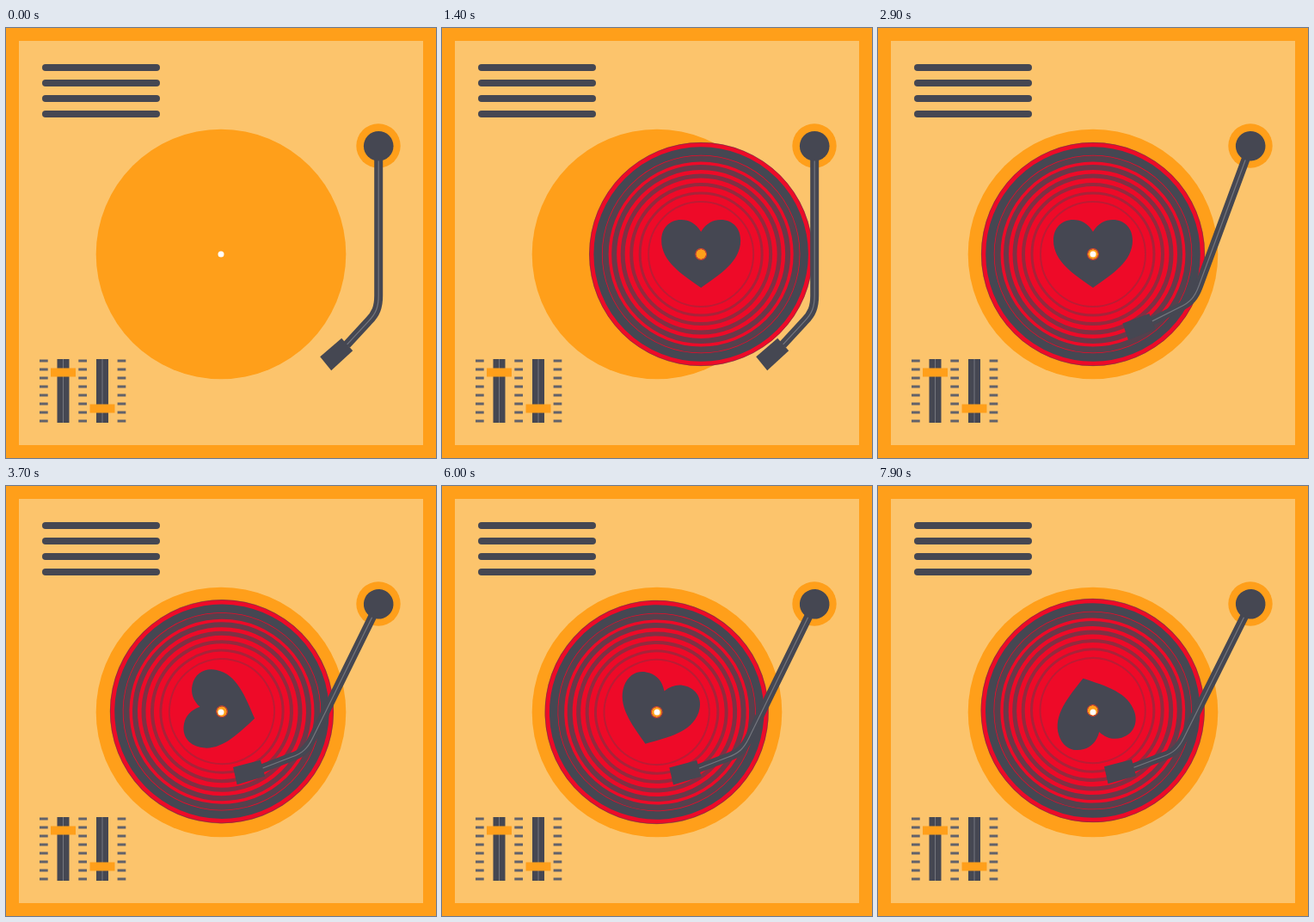
An HTML page with a canvas that plays this animation: 500 px wide and 500 px high, repeating every 8 s.

```html
<!DOCTYPE html>
<html lang="en">
<head>
<meta charset="utf-8">
<title>Turntable</title>
<style>
  html, body { margin: 0; width: 100%; height: 100%; overflow: hidden; }
  canvas { display: block; width: 500px; height: 500px; }
</style>
</head>
<body>
<canvas id="stage" width="500" height="500"></canvas>
<script>
const ORANGE = '#ff9f1a', PANEL = '#fcc46c', DARK = '#454752', RED = '#ee0a28', SHINE = '#74767e';
const LOOP = 8000, STEP = 100;
const ctx = document.getElementById('stage').getContext('2d');

const HEART = new Path2D('M0-26C-6-36-14-40-23-40C-37-40-46-30-46-16C-46 8-23 23 0 39' +
  'C23 23 46 8 46-16C46-30 37-40 23-40C14-40 6-36 0-26Z');
const ARM = new Path2D('M0 0V174C0 187-3 195-12 204L-37 231');
const HEAD = new Path2D('M-68 245L-43 223.5L-30 238L-55 261Z');

const clamp = p => Math.max(0, Math.min(1, p));
const easeInOut = p => p < 0.5 ? 2 * p * p : 1 - 2 * (1 - p) ** 2;
const progress = (t, start, length) => easeInOut(clamp((t - start) / length));

function rect(x, y, w, h, color) {
  ctx.fillStyle = color;
  ctx.fillRect(x, y, w, h);
}

function disc(x, y, r, color) {
  ctx.fillStyle = color;
  ctx.beginPath();
  ctx.arc(x, y, r, 0, 2 * Math.PI);
  ctx.fill();
}

function ring(r, width, color, alpha = 1) {
  ctx.globalAlpha = alpha;
  ctx.strokeStyle = color;
  ctx.lineWidth = width;
  ctx.beginPath();
  ctx.arc(0, 0, r, 0, 2 * Math.PI);
  ctx.stroke();
  ctx.globalAlpha = 1;
}

function stroke(path, width, color) {
  ctx.strokeStyle = color;
  ctx.lineWidth = width;
  ctx.stroke(path);
}

function drawDeck() {
  rect(0, 0, 500, 500, ORANGE);
  rect(15, 15, 470, 470, PANEL);

  ctx.lineCap = 'round';
  for (let y = 46; y <= 100; y += 18) stroke(new Path2D(`M46 ${y}H175`), 8, DARK);
  ctx.lineCap = 'butt';

  for (const x of [39, 84.3, 129.6])
    for (let y = 385.5; y < 460; y += 10) rect(x, y, 9.7, 3, '#62626a');
  for (const [x, y] of [[66.5, 395.5], [112, 437.5]]) {
    rect(x - 7, 385, 14, 74, DARK);
    rect(x - 0.5, 385, 1, 74, SHINE);
    rect(x - 14.5, y, 29, 10, ORANGE);
  }

  disc(250, 263, 145.3, ORANGE);
  disc(250, 263, 3.5, '#fff');
  disc(433, 137, 25.7, ORANGE);
}

function drawRecord(shift, angle) {
  ctx.save();
  ctx.translate(250 + shift, 262);
  ctx.rotate(angle);
  ctx.translate(0, 1); // slightly off-centre, so the record wobbles

  // The spindle hole stays open
  const body = new Path2D();
  body.arc(0, 0, 131, 0, 2 * Math.PI);
  body.moveTo(6, 0);
  body.arc(0, 0, 6, 0, 2 * Math.PI);
  ctx.clip(body, 'evenodd');

  disc(0, 0, 130, RED);
  ring(129.7, 1, DARK, 0.5);
  ring(120, 9.5, DARK);
  for (let i = 0; i < 6; i++) ring(111 - 10 * i, 7 - i, DARK, 0.9 - 0.12 * i);
  ctx.fillStyle = DARK;
  ctx.fill(HEART);
  ring(6.3, 1.2, '#d8402c');
  ctx.restore();
}

function drawArm(angle) {
  ctx.save();
  ctx.translate(433.2, 137.3);
  ctx.rotate(angle);
  stroke(ARM, 10, DARK);
  stroke(ARM, 1.2, SHINE);
  ctx.fillStyle = DARK;
  ctx.fill(HEAD);
  disc(0, 0, 17.3, DARK);
  ctx.restore();
}

function draw(now) {
  const t = Math.floor((now % LOOP) / STEP) * STEP;
  const shift = 430 * (1 - progress(t, 160, 1640));
  const spin = -114 * Math.max(0, t - 3016) / 1000;
  const sway = t > 3450 ? 0.5 * (1 - Math.cos((t - 3450) / 2500 * 2 * Math.PI)) : 0;
  const swing = 26.1 * progress(t, 1800, 1650) + sway;

  drawDeck();
  drawRecord(shift, spin * Math.PI / 180);
  drawArm(swing * Math.PI / 180);
}

const start = performance.now();
function tick() {
  draw(performance.now() - start);
  requestAnimationFrame(tick);
}
tick();
</script>
</body>
</html>
```
